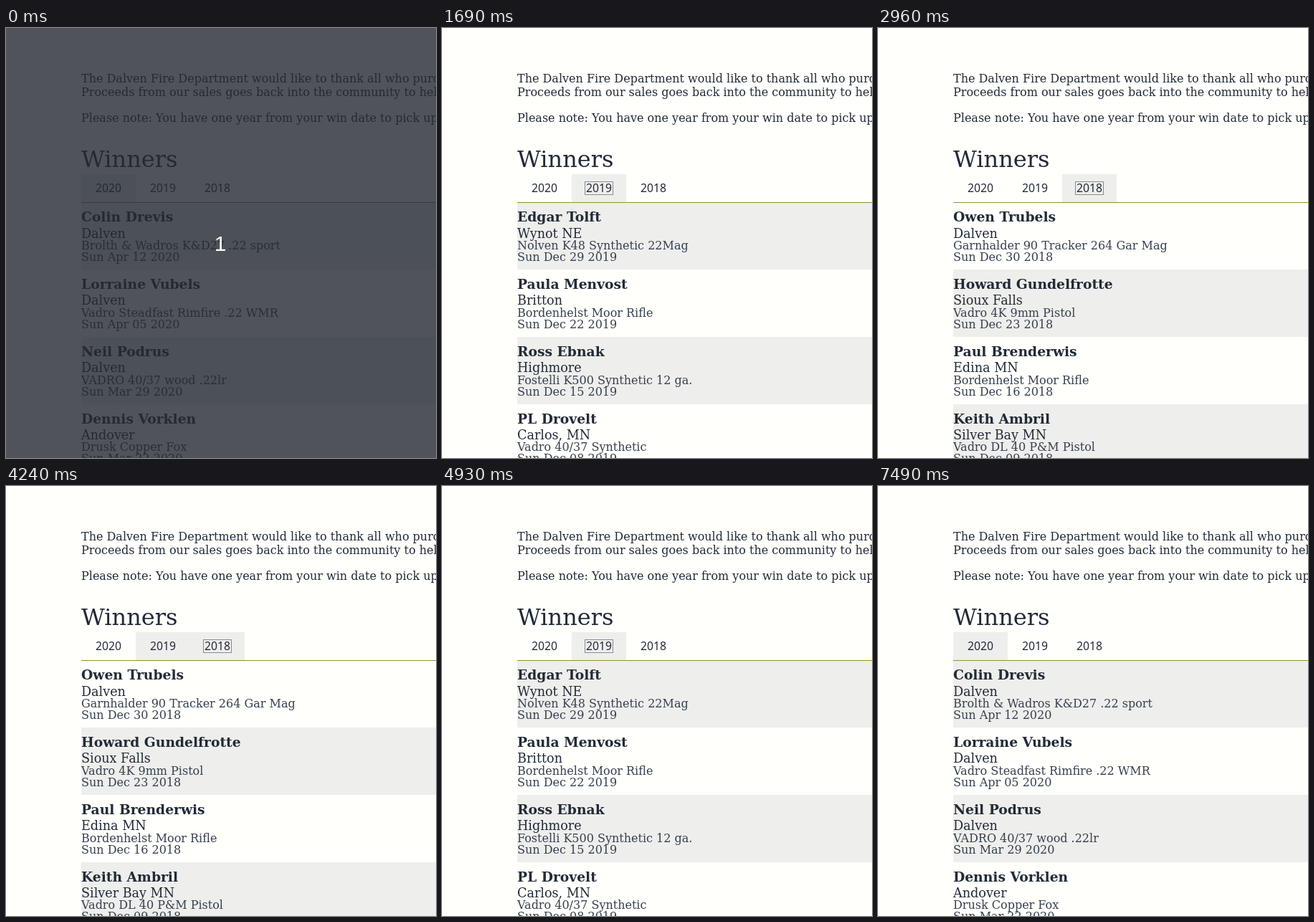
Write an HTML page that moves like this. It is 600x600 px and loops after 7.53 s.

```html
<!DOCTYPE html>
<html lang="en">
<head>
<meta charset="utf-8">
<title>Winners</title>
<style>
  html, body { margin: 0; width: 100%; height: 100%; overflow: hidden; background: #fffffc; }
  svg { display: block; width: 600px; height: 600px; }
  text { font: 16px "DejaVu Serif", serif; fill: #212b37; white-space: pre; }
  .heading { font-size: 32px; }
  .name { font-size: 18.72px; font-weight: bold; }
  .city { font-size: 17.6px; }
  .detail { fill: #35404f; }
  .tab { font: 15.75px "Noto Sans", sans-serif; }
  .count { font: 30px "Liberation Sans", sans-serif; fill: #fff; text-anchor: middle; }
  .shade { fill: #eeeeec; }
  .focus { fill: none; stroke: #212b37; stroke-dasharray: 1 1; }
</style>
</head>
<body>
<svg id="stage" viewBox="0 0 600 600"></svg>
<script>
const LOOP = 7530, LEFT = 105, TAB_WIDTH = 76, ROW_TOP = 243.9, ROW_HEIGHT = 93.8;

// Each year: first shaded row, then name | city | prize | date.
const years = [
  { label: 2020, shaded: 0, rows: [
    'Colin Drevis|Dalven|Brolth & Wadros K&D27 .22 sport|Sun Apr 12 2020',
    'Lorraine Vubels|Dalven|Vadro Steadfast Rimfire .22 WMR|Sun Apr 05 2020',
    'Neil Podrus|Dalven|VADRO 40/37 wood .22lr|Sun Mar 29 2020',
    'Dennis Vorklen|Andover|Drusk Copper Fox|Sun Mar 22 2020'] },
  { label: 2019, shaded: 0, rows: [
    'Edgar Tolft|Wynot NE|Nolven K48 Synthetic 22Mag|Sun Dec 29 2019',
    'Paula Menvost|Britton|Bordenhelst Moor Rifle|Sun Dec 22 2019',
    'Ross Ebnak|Highmore|Fostelli K500 Synthetic 12 ga.|Sun Dec 15 2019',
    'PL Drovelt|Carlos, MN|Vadro 40/37 Synthetic|Sun Dec 08 2019'] },
  { label: 2018, shaded: 1, rows: [
    'Owen Trubels|Dalven|Garnhalder 90 Tracker 264 Gar Mag|Sun Dec 30 2018',
    'Howard Gundelfrotte|Sioux Falls|Vadro 4K 9mm Pistol|Sun Dec 23 2018',
    'Paul Brenderwis|Edina MN|Bordenhelst Moor Rifle|Sun Dec 16 2018',
    'Keith Ambril|Silver Bay MN|Vadro DL 40 P&M Pistol|Sun Dec 09 2018'] }
];

// Start time, open tab, hovered tab, focused tab (-1 for none).
const steps = [
  [0, 0, -1, -1], [780, 0, 1, -1], [1620, 0, 1, 1], [1690, 1, 1, 1],
  [2220, 1, 2, 1], [2890, 1, 2, 2], [2960, 2, 2, 2], [4240, 2, 1, 2],
  [4400, 2, 0, 2], [4640, 2, 1, 2], [4840, 2, 1, 1], [4930, 1, 1, 1],
  [5640, 1, 0, 1], [6130, 1, 0, 0], [6200, 0, 0, 0], [7490, 0, -1, -1]
];

// Baselines snap down to whole pixels.
const text = (x, y, content, type = '') =>
  `<text x="${x}" y="${Math.floor(y)}" class="${type}">${String(content).replace(/&/g, '&amp;')}</text>`;
const rect = (x, y, w, h, type) =>
  `<rect x="${x}" y="${y}" width="${w}" height="${h}" class="${type}"/>`;

function listMarkup({ shaded, rows }) {
  return rows.map((row, i) => {
    const top = ROW_TOP + i * ROW_HEIGHT;
    const [name, city, prize, date] = row.split('|');
    return (i % 2 === shaded ? rect(LEFT, Math.floor(top), 495, 94, 'shade') : '') +
      text(LEFT, top + 26.9, name, 'name') + text(LEFT, top + 49.2, city, 'city') +
      text(LEFT, top + 65.6, prize, 'detail') + text(LEFT, top + 81.6, date, 'detail');
  }).join('');
}

function tabMarkup({ label }, i, open, hovered, focused) {
  const x = LEFT + i * TAB_WIDTH;
  return (i === open || i === hovered ? rect(x, 204, TAB_WIDTH, 39, 'shade') : '') +
    text(x + 20, 229, label, 'tab') +
    (i === focused ? rect(x + 18.5, 214.5, 39, 18, 'focus') : '');
}

const intro =
  text(LEFT, 76, 'The Dalven Fire Department would like to thank all who purchased') +
  text(LEFT, 95, 'Proceeds from our sales goes back into the community to help') +
  text(LEFT, 131, 'Please note: You have one year from your win date to pick up your prize') +
  text(LEFT, 194, 'Winners', 'heading');
const rule = '<path d="M105 243.5H600" stroke="#999220"/>';
const countdown = '<path d="M0 0H600V600H0Z" fill="#252a33" fill-opacity=".8"/>' +
  text(299, 311, 1, 'count');

const stage = document.getElementById('stage');
let shown = '';

function draw(now) {
  const time = now % LOOP;
  const [, open, hovered, focused] = steps.findLast(([start]) => start <= time);
  const picture = intro + listMarkup(years[open]) + rule +
    years.map((year, i) => tabMarkup(year, i, open, hovered, focused)).join('') +
    (time < 20 ? countdown : '');
  if (picture !== shown) stage.innerHTML = shown = picture;
  requestAnimationFrame(draw);
}
draw(0);
</script>
</body>
</html>
```
